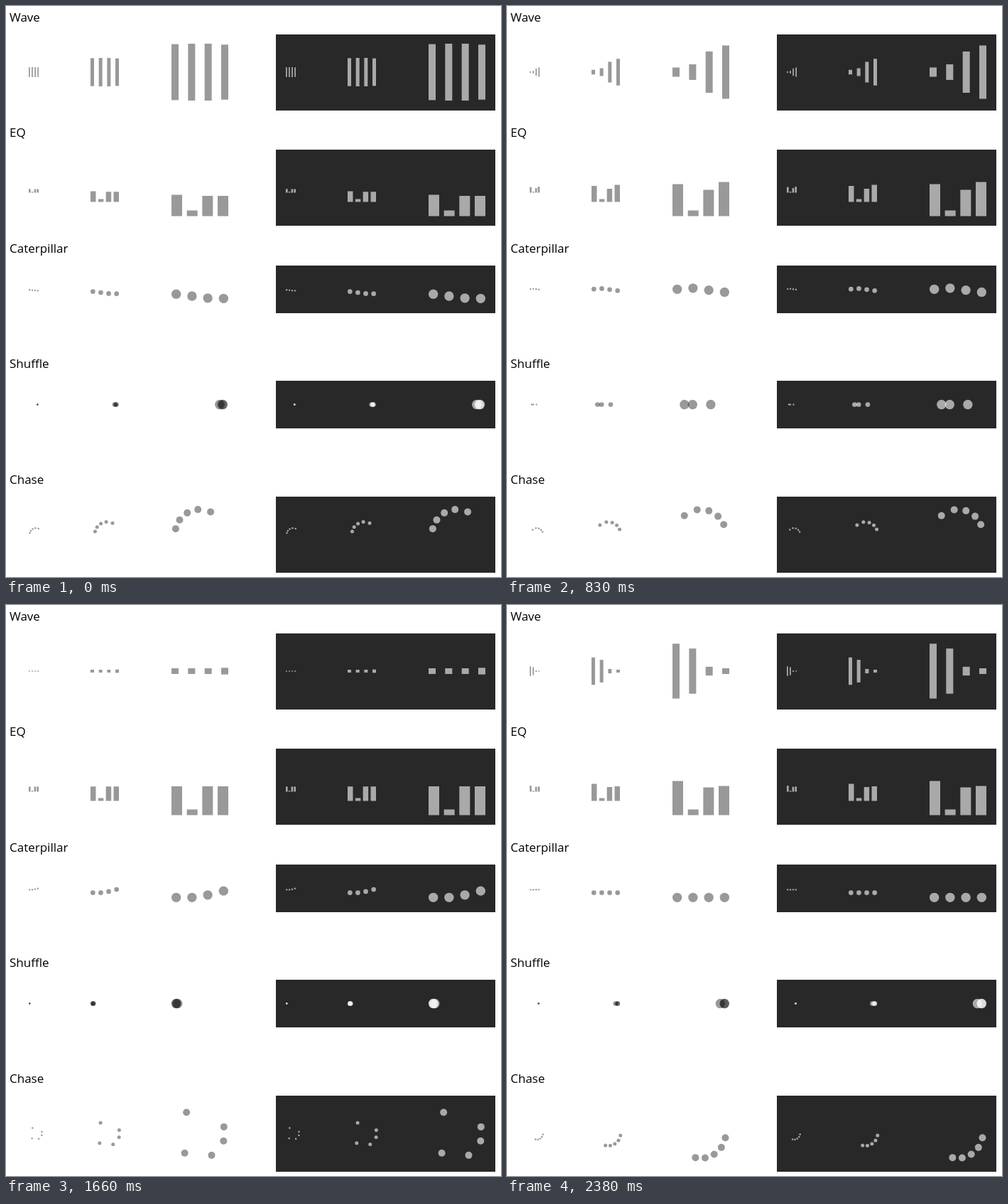
Recreate the animation shown at these times as an HTML page with a canvas. Size 697 by 803 pixels, loop 2480 ms.

```html
<!DOCTYPE html>
<html lang="en">
<head>
<meta charset="utf-8">
<title>Loaders</title>
<style>
  html, body { margin: 0; width: 100%; height: 100%; overflow: hidden; background: #fff; }
  canvas { display: block; }
</style>
</head>
<body>
<canvas width="697" height="803"></canvas>
<script>
const ctx = document.querySelector('canvas').getContext('2d');
const LOOP = 2480, LAST_MOVE = 2380;

const mod = (a, n) => ((a % n) + n) % n;
const clamp = u => Math.min(1, Math.max(0, u));
const easeInOut = u => {
  u = clamp(u);
  const a = u ** 1.75, b = (1 - u) ** 1.75;
  return a / (a + b);
};

// Eased interpolation through a list of points
function track(times, values, t) {
  let i = 0;
  while (i < times.length - 2 && t >= times[i + 1]) i++;
  const u = (t - times[i]) / (times[i + 1] - times[i]);
  return values[i] + (values[i + 1] - values[i]) * easeInOut(u);
}

function dot(x, y, d) {
  ctx.beginPath();
  ctx.arc(x, y, d / 2, 0, 2 * Math.PI);
  ctx.fill();
}

const WAVE_LAG = [218, 176, 69, 0];
function wave(x, y, size, t) {
  WAVE_LAG.forEach((lag, i) => {
    const p = mod(t - 549 - lag, 1080);
    const level = easeInOut(p / 346) - easeInOut((p - 503) / 216);
    const h = size * (0.1 + 0.9 * level);
    ctx.fillRect(x + i * size * 7 / 24, y - h / 2, size / 8, h);
  });
}

const EQ_TIMES = [0, 340, 830, 1280, 1660, 2090, 2380];
const EQ_LEVELS = [
  [30, 14, 45, 49, 40.5, 8, 48],
  [8, 52, 8, 24.5, 8, 24.5, 8],
  [28.5, 8, 37, 50.5, 40.5, 64, 39],
  [28.5, 58, 48, 8, 40.5, 8, 41]
];
function equalizer(x, y, size, t) {
  EQ_LEVELS.forEach((levels, i) => {
    const h = track(EQ_TIMES, levels, t) * size / 80;
    ctx.fillRect(x + i * size * 13 / 48, y + size / 2 - h, size * 3 / 16, h);
  });
}

function caterpillar(x, y, size, t) {
  const d = size / 6;
  for (let i = 0; i < 4; i++) {
    const p = mod(t - 486 - 63 * (3 - i), 1080);
    const lift = p < 216 ? 1 - (1 - p / 216) ** 1.7 : clamp(1 - (p - 216) / 328);
    dot(x + d / 2 + i * size * 5 / 18, y + d * (1 - 1.1 * lift), d);
  }
}

// Each dot: start to the right, start to the left, travel time
const SHUFFLE = [[650, 1292, 290], [692, 1308, 350], [726, 1324, 385]];
function shuffle(x, y, size, t) {
  const d = size / 6;
  for (const [right, left, span] of SHUFFLE) {
    const p = mod(t - right, 1350);
    const pos = easeInOut(p / span) - easeInOut((p - left + right) / span);
    dot(x + d / 2 + pos * (size - d), y, d);
  }
}

// One turn in degrees: exponential start, quick pass, exponential settling
function turn(t) {
  const p = mod(t + 270, 1350) - 270;
  if (p < 340) return 16 * 2 ** (p / 90) - 2;
  if (p < 380) return 217.5 + (p - 340) * 2.46;
  return 360 - 44 * 2 ** ((380 - p) / 90);
}
function chase(x, y, size, t) {
  const sway = track([0, 325, 785, 1030, 1350], [0, 16, -7, 0, 0], mod(t, 1350));
  const r = size * 7 / 16;
  for (let k = 0; k < 5; k++) {
    const deg = 11.3 + 0.0763 * t + sway + turn(t - 90 * k) - 22 * k;
    const a = deg * Math.PI / 180;
    dot(x + size / 2 + r * Math.sin(a), y - r * Math.cos(a), size / 8);
  }
}

const SLOTS = [[32, 14], [119, 40], [233, 80]];
const CHASE_SLOTS = [[32, 20], [122.5, 40], [233, 80]];
const ROWS = [
  { title: 'Wave', draw: wave, height: 107 },
  { title: 'EQ', draw: equalizer, height: 107 },
  { title: 'Caterpillar', draw: caterpillar, height: 67 },
  { title: 'Shuffle', draw: shuffle, height: 67 },
  { title: 'Chase', draw: chase, height: 107, slots: CHASE_SLOTS }
];

function render(now) {
  const t = Math.min(now % LOOP, LAST_MOVE);
  ctx.fillStyle = '#fff';
  ctx.fillRect(0, 0, 697, 803);
  ctx.font = '17px "Open Sans", "Noto Sans", sans-serif';
  ROWS.forEach(({ title, draw, height, slots = SLOTS }, i) => {
    const top = 39.5 + 162.5 * i;
    ctx.fillStyle = '#000';
    ctx.fillText(title, 5, top - 18);
    ctx.fillStyle = '#282828';
    ctx.fillRect(380, Math.round(top), 309, height);
    for (const [x, size] of slots) {
      ctx.fillStyle = 'rgba(0, 0, 0, 0.4)';
      draw(x, top + height / 2, size, t);
      ctx.fillStyle = 'rgba(255, 255, 255, 0.6)';
      draw(x + 362, top + height / 2, size, t);
    }
  });
  requestAnimationFrame(() => render(performance.now()));
}
render(performance.now());
</script>
</body>
</html>
```
